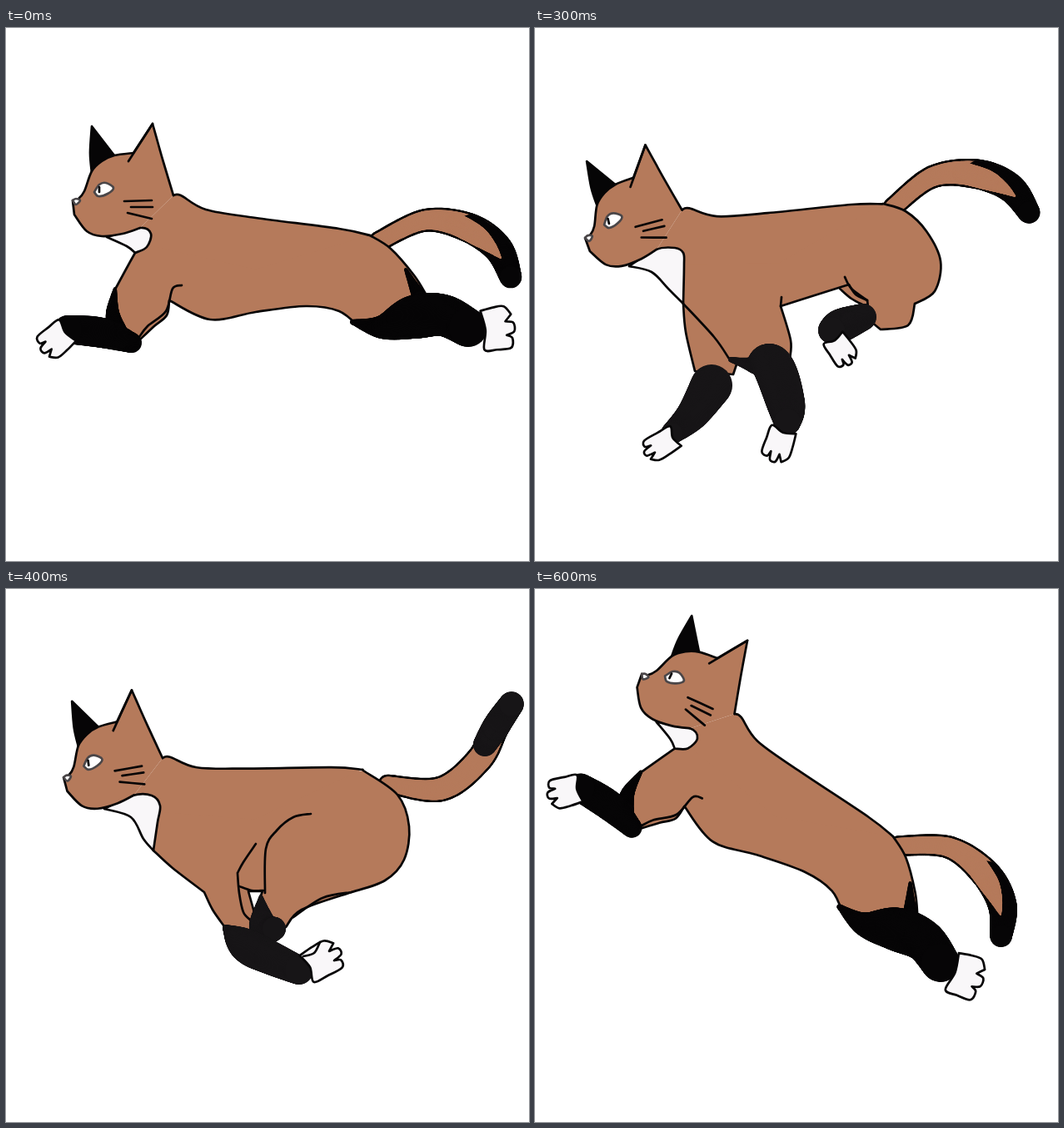
An HTML page with a canvas for the animation above (700 ms loop, 628 by 640 pixels).

```html
<!DOCTYPE html>
<html lang="en">
<head>
<meta charset="utf-8">
<title>Running cat</title>
<style>
html, body { margin: 0; width: 100%; height: 100%; overflow: hidden; background: #fff; }
canvas { display: block; width: 100vw; height: 100vh; }
</style>
</head>
<body>
<canvas id="stage" width="628" height="640"></canvas>
<script>
const ctx = document.getElementById('stage').getContext('2d');
const INK = '#060506', SOCK = '#171517', FUR = '#b57a5b', WHITE = '#f9f7f9';
const NAPE = [201, 201];

// Smooth curve through the points; "|" marks a corner.
function curve(text) {
  const path = new Path2D();
  let last;
  for (const part of text.split('|')) {
    const pts = part.trim().split(' ').map(p => p.split(',').map(Number));
    if (last) pts.unshift(last);
    else path.moveTo(...pts[0]);
    for (let i = 0; i < pts.length - 1; i++) {
      const b = pts[i], c = pts[i + 1], a = pts[i - 1] || b, d = pts[i + 2] || c;
      path.bezierCurveTo(b[0] + (c[0] - a[0]) / 6, b[1] + (c[1] - a[1]) / 6,
        c[0] - (d[0] - b[0]) / 6, c[1] - (d[1] - b[1]) / 6, ...c);
    }
    last = pts[pts.length - 1];
  }
  return path;
}

function paint(fill, path, stroke = INK) {
  ctx.fillStyle = fill;
  ctx.fill(path);
  ctx.strokeStyle = stroke;
  ctx.stroke(path);
}

const shape = (fill, text, stroke) => paint(fill, curve(text), stroke);
const line = text => ctx.stroke(curve(text));

// Point of a smooth run of knots [x, y, radius], u from 0 to 1 between b and c.
function blend(a, b, c, d, u) {
  return b.map((v, k) => v + u / 2 * (c[k] - a[k] + u * (2 * a[k] - 5 * v + 4 * c[k] - d[k]
    + u * (3 * (v - c[k]) + d[k] - a[k]))));
}

// Round limb swept along its knots, with an optional outline.
function limb(color, knots, edge = 0) {
  const sweep = (fill, grow) => {
    ctx.fillStyle = fill;
    for (let i = 0; i < knots.length - 1; i++) {
      const b = knots[i], c = knots[i + 1];
      for (let u = 0; u <= 1; u += 1 / 32) {
        const [x, y, r] = blend(knots[i - 1] || b, b, c, knots[i + 2] || c, u);
        ctx.beginPath();
        ctx.arc(x, y, Math.max(r + grow, 0.5), 0, 7);
        ctx.fill();
      }
    }
  };
  if (edge) sweep(INK, edge);
  sweep(color, -edge);
}

// Paw of unit size: ankle at 0,0 and three toes towards +x.
const foot = curve('0,-.45 .4,-.5 .75,-.5 .95,-.3|.75,-.15|1,-.1 1,.1 .75,.17|.92,.25 .85,.47 .4,.48 0,.45 .1,0 0,-.45');

function paw(x, y, deg, length, width) {
  const path = new Path2D();
  path.addPath(foot, new DOMMatrix().translate(x, y).rotate(deg).scale(length, width));
  paint(WHITE, path);
}

// Draws with the nape moved to x, y and turned.
function tilt([x, y, deg], draw) {
  ctx.save();
  ctx.translate(x, y);
  ctx.rotate(deg * Math.PI / 180);
  ctx.translate(-NAPE[0], -NAPE[1]);
  draw();
  ctx.restore();
}

function tail() {
  limb(FUR, [[448, 256, 11], [503, 231, 12.5], [556, 240, 16.5], [591, 265, 16], [606, 299, 12]], 1.3);
  limb(INK, [[558, 241, 17], [591, 265, 16.5], [606, 299, 13]]);
  limb(FUR, [[540, 235, 13], [565, 249, 12], [582, 263, 7], [594, 276, 1]]);
}

function back() {
  const spine = '201,201|210,201 240,218 300,228 400,241 437,249';
  ctx.fillStyle = FUR;
  ctx.fill(curve(spine + '|300,290|175,262|161,240'));
  line(spine);
}

function head() {
  shape(INK, '103,118|130,153|103,174|101,150 103,118');
  shape(FUR, '161,240 140,247 115,250 97,244 82,224|80,207|87,205 94,196 103,172 115,160 130,153 153,150|176,115|183,140 189,161 201,201');
  line('147,160|176,115');
  shape('#fff', '80,207 84,205 89,207 84,212 80,207', '#4a4648');
  shape('#fff', '106,197 112,188 120,186 129,192 122,199 111,202 106,197', '#4a4648');
  ctx.strokeStyle = INK;
  line('112,191|112,197');
  line('142,208|175,207');
  line('150,215|176,215');
  line('146,222|175,229');
}

// Back, white chest and head, in the order they overlap.
function front(at, chest) {
  tilt(at, back);
  shape(WHITE, chest);
  tilt(at, head);
}

function stretch() {
  tail();
  shape(FUR, '165,255|155,270 132,312|122,345|160,375|178,358 193,345 196,327|245,350 300,341 360,334 400,340 425,360|480,360|505,321|490,297 462,265 437,249');
  front([...NAPE, 0], '121,251 161,240 174,247 169,263 155,270|145,262 121,251');
  line('211,309 200,313 192,340 170,358 160,371');
  limb(INK, [[131, 313, 2], [128, 342, 8], [134, 366, 12]]);
  limb(INK, [[151, 378, 12], [115, 366, 18], [74, 362, 17]]);
  paw(74, 363, 141, 39, 36);
  limb(INK, [[480, 290, 2], [497, 325, 9]]);
  limb(INK, [[416, 353, 3], [452, 359, 14], [490, 347, 26], [525, 345, 25], [555, 360, 23]]);
  paw(572, 363, -6, 38, 52);
}

function reach() {
  const at = [176.5, 218.5, -13.2];
  tilt(at, tail);
  shape(FUR, '143,298 133,315 118,365|130,380|160,378|153,302');
  limb(INK, [[124, 351, 3], [110, 370, 12]]);
  limb(INK, [[145, 382, 13], [100, 376, 20], [58, 378, 13]]);
  paw(50, 378, 160, 27, 28);
  shape(FUR, '150,280|153,302 151,340 166,385 178,410|203,417|222,390 226,352|270,348 330,324 390,306 417,316|460,320|490,266|455,231 418,211');
  front(at, '111,285 148,266 160,270 160,282 153,302|135,290 111,285');
  line('226,352|231,339');
  limb(INK, [[154, 351, 2], [168, 393, 7], [184, 421, 19], [180, 452, 19], [150, 477, 17], [136, 486, 13]]);
  paw(135, 490, 132, 36, 33);
  limb(INK, [[420, 316, 4], [460, 307, 18], [490, 292, 28], [533, 286, 25], [536, 315, 22], [534, 346, 20], [540, 361, 13]]);
  paw(546, 361, -25, 38, 32);
}

function land() {
  const at = [176.5, 218.5, -13.2];
  tilt(at, tail);
  shape(FUR, '178,331 181,365 192,412|238,416|245,395');
  limb(SOCK, [[212, 429, 25], [189, 464, 19], [164, 487, 13]]);
  paw(169, 490, 150, 42, 30);
  shape(FUR, '366,313 380,325 395,333|410,330|377,308');
  shape(FUR, '165,270|178,331|215,371 233,397|306,397|307,375 295,334|320,326 377,308|385,320 399,327|403,350 415,362|448,357 456,331|480,316 487,280 470,244 445,220 418,211');
  front(at, '113,286 145,266 168,264 178,270 179,285 178,331|160,313 140,293 113,286');
  line('295,334|296,323');
  line('372,299 380,313 399,327');
  limb(SOCK, [[235, 398, 3], [260, 404, 9], [284, 404, 24], [301, 450, 23], [303, 473, 16]]);
  paw(299, 482, 110, 40, 34);
  limb(SOCK, [[394, 347, 16], [368, 357, 20], [356, 363, 16]]);
  paw(358, 372, 57, 37, 30);
}

function gather() {
  const at = [188, 203, -8.2];
  limb(FUR, [[458, 234, 10], [522, 240, 14], [568, 205, 15], [588, 166, 15], [607, 138, 13.5]], 1.3);
  limb(SOCK, [[575, 187, 14], [588, 166, 16], [607, 138, 14.5]]);
  shape(FUR, '165,262|177,314|200,335 238,364|248,385 262,405|290,420|336,406|355,385 415,364|455,350 478,325 484,285 470,247 429,218');
  front(at, '118,264 152,248 175,248 185,260 182,280 177,314|165,300 150,274 118,264');
  shape('#fff', '291,363|308,363|298,388|291,363');
  line('300,306 285,328 278,341|280,365 285,388 294,398');
  line('280,357 295,362 309,362');
  line('366,270 345,274 325,290 312,312 311,365');
  line('415,364 380,371 345,394');
  limb(SOCK, [[306, 369, 2], [309, 406, 17], [322, 408, 14]]);
  limb(SOCK, [[264, 407, 4], [288, 428, 20], [318, 443, 20], [352, 458, 17]]);
  paw(361, 456, -28, 45, 40);
  line('357,441 370,437 377,424');
}

function rise() {
  const at = [248.5, 179, 14.6];
  limb(FUR, [[488, 315, 12], [540, 309, 13], [585, 272, 14], [605, 225, 15], [600, 182, 13]], 1.3);
  limb(INK, [[600, 248, 15], [605, 225, 16], [600, 182, 14]]);
  limb(FUR, [[587, 268, 12], [597, 240, 10], [600, 210, 1]]);
  shape(FUR, '384,350 387,370 402,396|415,398|396,350');
  shape(FUR, '200,215|199,254 193,300 193,320|220,350|247,356|260,348 268,337|335,342 394,352|394,365 408,397|470,420|504,410|504,355 482,300 465,284');
  front(at, '160,206 202,206 209,215 208,235 200,254|185,229 160,206');
  line('247,356 268,337 272,325 271,310');
  line('394,352|394,340');
  limb(INK, [[197, 324, 4], [224, 353, 21], [234, 378, 17], [234, 395, 16], [252, 397, 15]]);
  paw(262, 397, -4, 25, 32);
  limb(INK, [[405, 398, 6], [445, 422, 22], [477, 424, 27], [481, 458, 20], [481, 478, 17]]);
  paw(497, 501, 180, 63, 27);
  line('442,501 446,495 468,493');
}

const leap = () => tilt([239.5, 150, 26.2], stretch);
const poses = [stretch, stretch, reach, land, gather, rise, leap];

function frame(now) {
  ctx.clearRect(0, 0, 628, 640);
  ctx.lineCap = ctx.lineJoin = 'round';
  ctx.lineWidth = 2.7;
  ctx.strokeStyle = INK;
  poses[Math.floor(now % 700 / 100)]();
  requestAnimationFrame(frame);
}
requestAnimationFrame(frame);
</script>
</body>
</html>
```
